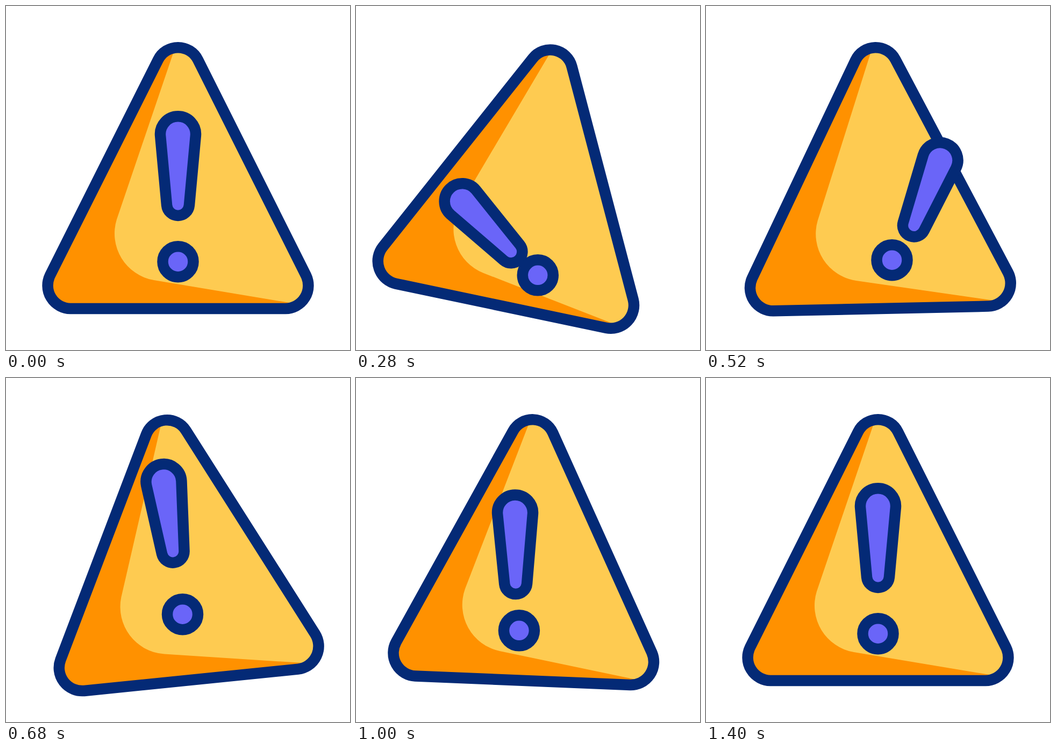
These frames come from a looping animation (640 px wide and 640 px high, 2 s). An HTML page:

```html
<!DOCTYPE html>
<html>
<head>
<meta charset="utf-8">
<title>Warning sign</title>
<style>
  html, body { margin: 0; width: 100%; height: 100%; overflow: hidden; background: #fff; }
  svg { display: block; width: 100%; height: 100%; }
  .line { stroke: #042a76; stroke-width: 20.5; }
  .mark { fill: #6a65f8; }
</style>
</head>
<body>
<svg viewBox="0 0 640 640">
  <defs>
    <path id="triangle" d="M120 563H520A43 43 0 0 0 558 501L357 100A41.4 41.4 0 0 0 283 100L82 501A43 43 0 0 0 120 563Z"/>
  </defs>
  <g id="sign">
    <use href="#triangle" fill="#fecb51"/>
    <path fill="#ff9100" d="M314 79L206 397A88 88 0 0 0 275 510L545 555L520 563H120A43 43 0 0 1 82 501L283 100Q293 83 314 79Z"/>
    <use href="#triangle" fill="none" class="line"/>
  </g>
  <path id="bar" class="line mark" d="M-32.9 -56.6A33 33 0 1 1 32.9 -56.6L20.9 73.5A21 21 0 0 1 -20.9 73.5Z"/>
  <circle id="dot" class="line mark" r="28.5"/>
</svg>
<script>
const LOOP = 2000, STEP = 40;

// The sign swings from turn to turn, each swing half as wide as the last.
const turns = [0, 314, 640, 920, 1160];
const swing = n => n % 4 ? -24 * (-0.5) ** n : 0;
const ease = u => u ** 3 * (6 * u * u - 15 * u + 10);

function signAngle(t) {
  const next = turns.findIndex(turn => turn > t);
  if (next < 0) return 0;
  const from = swing(next - 1), start = turns[next - 1];
  return from + (swing(next) - from) * ease((t - start) / (turns[next] - start));
}

// Poses of the thrown mark: time, bar x, y and angle, dot x and y.
const rest = t => [t, 0, 0, 0, 0, 0];
const poses = [
  rest(0),
  [314, -84, 112, -45.5, 20, 26],
  [520, 93.5, 44.5, 21.8, 26, -3],
  [680, -18.8, -45.7, -7.5, 8.5, -36],
  [840, -28, -24, -3.9, -9.5, -21.7],
  [1160, -15, 35.7, 1.4, -19.7, 3.3],
  rest(1400)
];

// Smooth curve through the poses that comes to rest at every turning point.
function markValue(t, k) {
  const next = poses.findIndex(pose => pose[0] > t);
  if (next < 0) return 0;
  const slope = i => i < 0 || i > poses.length - 2 ? 0
    : (poses[i + 1][k] - poses[i][k]) / (poses[i + 1][0] - poses[i][0]);
  const tangent = i => {
    const a = slope(i - 1), b = slope(i);
    return a * b > 0 ? 2 * a * b / (a + b) : 0;
  };
  const a = poses[next - 1], b = poses[next], span = b[0] - a[0];
  const u = (t - a[0]) / span, v = 1 - u;
  return a[k] * v * v * (1 + 2 * u) + b[k] * u * u * (3 - 2 * u)
    + span * u * v * (tangent(next - 1) * v - tangent(next) * u);
}

const [sign, bar, dot] = ['sign', 'bar', 'dot'].map(id => document.getElementById(id));
const place = (el, transform) => el.setAttribute('transform', transform);

function draw() {
  const t = Math.floor(performance.now() % LOOP / STEP) * STEP;
  const [barX, barY, barAngle, dotX, dotY] = [1, 2, 3, 4, 5].map(k => markValue(t, k));
  place(sign, `rotate(${signAngle(t)} 320 320)`);
  place(bar, `translate(${320 + barX} ${297.5 + barY}) rotate(${barAngle})`);
  place(dot, `translate(${320 + dotX} ${475.7 + dotY})`);
  requestAnimationFrame(draw);
}
draw();
</script>
</body>
</html>
```
